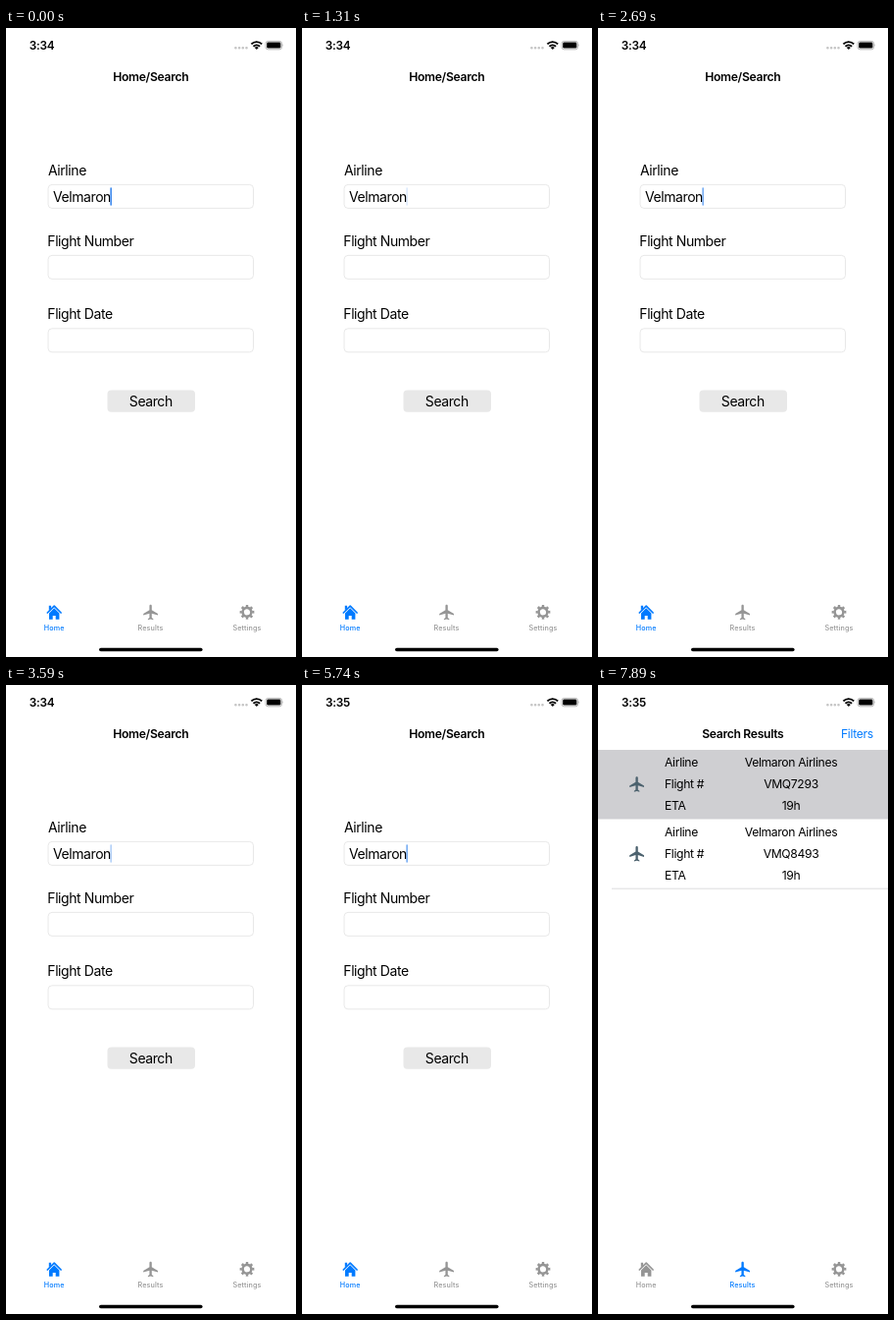
Animation of 296x640 px, one loop 8 s. Source, as an HTML page:

```html
<!DOCTYPE html>
<html lang="en">
<head>
<meta charset="utf-8">
<title>Flight search</title>
<style>
  html, body { margin: 0; width: 100%; height: 100%; overflow: hidden; background: #fff; }
  svg { display: block; width: 100%; height: 100%; }
  text { font: 400 12.15px Inter, sans-serif; letter-spacing: -.33px; }
  .large { font-size: 14px; letter-spacing: -.42px; }
  .title { font-weight: 600; letter-spacing: -.3px; }
  .clock { font-weight: 600; font-size: 11.8px; letter-spacing: -.25px; }
  .mid { text-anchor: middle; }
  .tab text { font-size: 7.15px; font-weight: 500; letter-spacing: .15px; text-anchor: middle; }
  .tab { fill: #959595; color: #959595; }
  .link { fill: #007aff; }
  .field { fill: #fff; stroke: #e3e3e3; stroke-width: .8; }

  .caret, .before, .after, .early, .late, .rows, .tab.home, .tab.results {
    animation: 8s step-end infinite;
  }
  .caret { animation-name: blink; }
  .before { animation-name: hide-search; }
  .after { animation-name: show-results; }
  .early { animation-name: hide-early; }
  .late { animation-name: show-late; }
  .rows { animation-name: show-rows; }
  .tab.home { animation-name: deselect; }
  .tab.results { animation-name: select; }

  @keyframes blink {
    0%, 12.75%, 50.75% { opacity: 1; }
    2%, 14.875%, 27.625%, 40.375%, 53.125%, 65.875% { opacity: .55; }
    3.5%, 16.375%, 29.125%, 41.875%, 54.625%, 67.375% { opacity: .18; }
    6.5%, 19.375%, 32.125%, 44.875%, 57.625%, 70.375% { opacity: .4; }
    8%, 20.875%, 33.625%, 46.375%, 59.125%, 71.75% { opacity: .7; }
  }
  @keyframes hide-search { 0% { visibility: visible; } 78.5%, 100% { visibility: hidden; } }
  @keyframes show-results { 0% { visibility: hidden; } 78.5%, 100% { visibility: visible; } }
  @keyframes hide-early { 0% { visibility: visible; } 53.125%, 100% { visibility: hidden; } }
  @keyframes show-late { 0% { visibility: hidden; } 53.125%, 100% { visibility: visible; } }
  @keyframes show-rows { 0% { visibility: hidden; } 98.625%, 100% { visibility: visible; } }
  @keyframes deselect {
    0% { fill: #007aff; color: #007aff; }
    78.5%, 100% { fill: #959595; color: #959595; }
  }
  @keyframes select {
    0% { fill: #959595; color: #959595; }
    78.5%, 100% { fill: #007aff; color: #007aff; }
  }
</style>
</head>
<body>
<svg viewBox="0 0 296 640">
  <defs>
    <path id="plane" transform="scale(.78) translate(-11.5 -12)"
      d="M21 16v-2l-8-5V3.5C13 2.67 12.33 2 11.5 2S10 2.67 10 3.5V9l-8 5v2l8-2.5V19l-2 1.5V22l3.5-1 3.5 1v-1.5L13 19v-5.5z"/>
    <g id="labels">
      <text x="68" y="83">Airline</text>
      <text x="68" y="105">Flight #</text>
      <text x="68" y="127">ETA</text>
      <text class="mid" x="197" y="83">Velmaron Airlines</text>
      <text class="mid" x="197" y="127">19h</text>
      <use href="#plane" x="39.6" y="101" fill="#4c626e"/>
    </g>
  </defs>

  <!-- Status bar -->
  <text class="clock early mid" x="36.5" y="21.8">3:34</text>
  <text class="clock late mid" x="36.5" y="21.8">3:35</text>
  <path d="M234.4 20.2h13" stroke="#c4c4c4" stroke-width="2.6" stroke-linecap="round" stroke-dasharray="0 3.7"/>
  <g fill="none" stroke="#000" stroke-width="1.9">
    <path d="M250.4 16.4a7.6 7.6 0 0 1 10.8 0"/>
    <path d="M252.5 18.8a4.7 4.7 0 0 1 6.6 0"/>
  </g>
  <path d="M255.8 22l-2-2.1a2.9 2.9 0 0 1 4 0z"/>
  <rect x="265" y="13.4" width="16.6" height="8.4" rx="2.5" fill="none" stroke="#a6a6a6" stroke-width=".8"/>
  <rect x="266.2" y="14.6" width="14.2" height="6" rx="1.4"/>
  <path d="M282.5 16.1q1.2 1.5 0 3z" fill="#a6a6a6"/>

  <!-- Search screen -->
  <g class="before">
    <text class="title mid" x="147.8" y="54.2">Home/Search</text>
    <text class="large" x="43" y="150">Airline</text>
    <text class="large" x="42.3" y="222">Flight Number</text>
    <text class="large" x="42.3" y="296.4">Flight Date</text>
    <rect class="field" x="43" y="159.4" width="209.5" height="24" rx="4"/>
    <rect class="field" x="43" y="231.4" width="209.5" height="24" rx="4"/>
    <rect class="field" x="43" y="305.8" width="209.5" height="24" rx="4"/>
    <text class="large" x="48" y="176.5">Velmaron</text>
    <rect x="103.5" y="368.5" width="89.5" height="22.3" rx="4" fill="#e8e8e8"/>
    <text class="large mid" x="147.8" y="384.7">Search</text>
    <rect class="caret" x="106.4" y="162.3" width="1.5" height="18.5" rx=".7" fill="#2f80ec"/>
  </g>

  <!-- Results screen -->
  <g class="after">
    <text class="title mid" x="147.8" y="54.2">Search Results</text>
    <text class="link" x="248" y="54.2">Filters</text>
  </g>
  <g class="rows">
    <rect y="66" width="296" height="70.5" fill="#cfcfd2"/>
    <use href="#labels"/>
    <text class="mid" x="197" y="105">VMQ7293</text>
    <use href="#labels" y="70.8"/>
    <text class="mid" x="197" y="175.8">VMQ8493</text>
    <path d="M14 207.2H296" stroke="#d4d4d6" stroke-width=".8"/>
  </g>

  <!-- Tab bar -->
  <g class="tab home">
    <path d="M42.3 595l6.9-6.9 6.9 6.9" fill="none" stroke="currentColor" stroke-width="1.7" stroke-linecap="round" stroke-linejoin="round"/>
    <path d="M43.8 587.8h2.3v2.6l-2.3 2.2z"/>
    <path d="M44 595.4l5.2-5.2 5.2 5.2v6.3h-3.7v-3.7h-3v3.7h-3.7z"/>
    <text x="49.2" y="612.8">Home</text>
  </g>
  <g class="tab results">
    <use href="#plane" x="147.6" y="594.5"/>
    <text x="147.6" y="612.8">Results</text>
  </g>
  <g class="tab">
    <g fill="none" stroke="currentColor" transform="translate(246 594.3) rotate(-11.25)">
      <circle r="4.4" stroke-width="2.6"/>
      <circle r="6.3" stroke-width="2.2" pathLength="16" stroke-dasharray="1"/>
    </g>
    <text x="246" y="612.8">Settings</text>
  </g>
  <rect x="95" y="630.7" width="105.6" height="3.6" rx="1.8"/>
</svg>
</body>
</html>
```
